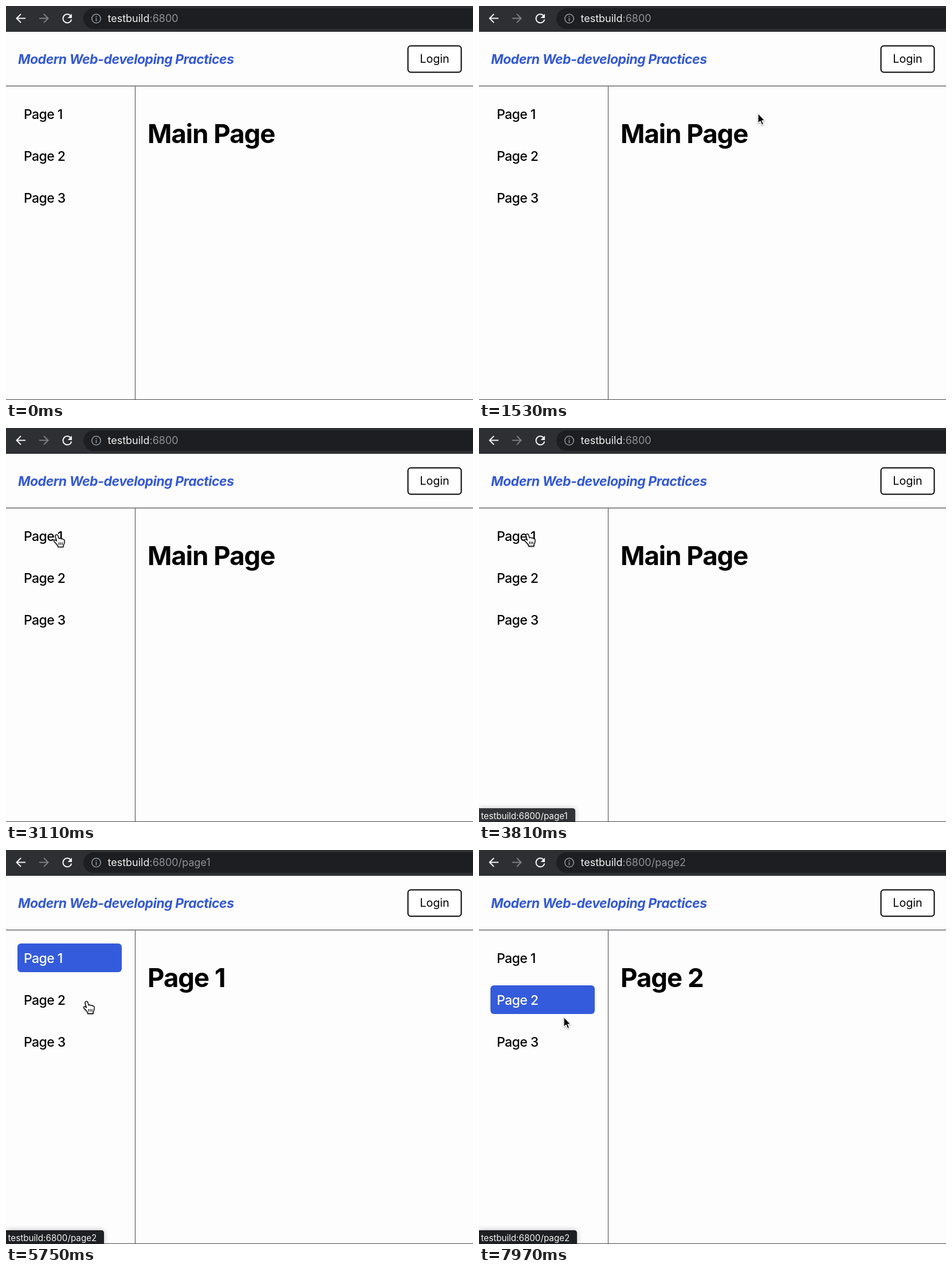
These frames come from a looping animation (815 by 687 pixels, 7990 ms). An HTML page:

```html
<!DOCTYPE html>
<html lang="en">
<head>
<meta charset="utf-8">
<style>
  html, body { margin: 0; width: 100%; height: 100%; overflow: hidden; background: #fdfdfd; }
  svg { display: block; width: 100%; height: 100%; font-family: Inter, "Open Sans", sans-serif; }
  .icon { fill: none; stroke: #f1f1f2; stroke-width: 2; }
  .dim { stroke: #7d7e82; }
  .rule { fill: none; stroke: #66666a; stroke-width: 1.3; }
  .brand { font: italic 700 23px Inter, sans-serif; letter-spacing: -.02em; fill: #3459d6; }
  .nav { font-size: 23px; font-weight: 500; letter-spacing: -.025em; }
  .heading { font-size: 45.5px; font-weight: 700; letter-spacing: -.022em; }
  #status { filter: drop-shadow(0 0 5px #0004); }
  #pointer { filter: drop-shadow(0 1.5px 1.2px #0006); stroke-linejoin: round; }
</style>
</head>
<body>
<svg viewBox="0 0 815 687">
  <rect width="815" height="687" fill="#fdfdfd"/>

  <rect width="815" height="45" fill="#2e2f33"/>
  <rect x="135" y="4" width="720" height="36" rx="18" fill="#1d1e21"/>
  <path class="icon" d="M34 21.5H18.5M26 14l-7.5 7.5L26 29"/>
  <path class="icon dim" d="M58 21.5h15.500M66 14l7.500 7.500L66 29"/>
  <path class="icon" d="M113 17.300A7.500 7.500 0 1 0 114.300 23.500"/>
  <path d="M115 13.500v7.500h-7.500z" fill="#f1f1f2"/>
  <circle class="icon" cx="157.500" cy="22" r="7.700" style="stroke:#8e969b;stroke-width:1.6"/>
  <path class="icon" d="M157.500 17.500v2M157.500 21v5.500" style="stroke:#8e969b;stroke-width:1.700"/>
  <text x="177.500" y="28" font-size="18" fill="#f1f1f2">testbuild<tspan id="path" fill="#8e9196"></tspan></text>

  <path class="rule" d="M0 139.500H815M225.500 139.500V687M0 686.300H815"/>
  <text class="brand" x="21" y="101">Modern Web-developing Practices</text>
  <rect x="701.500" y="69.500" width="93" height="46" rx="5" fill="#fff" stroke="#000" stroke-width="2"/>
  <text x="748" y="99" font-size="19.700" text-anchor="middle">Login</text>

  <rect id="highlight" x="20" width="182" height="50" rx="6" fill="#345bdb"/>
  <text class="nav" x="31" y="197">Page 1</text>
  <text class="nav" x="31" y="270">Page 2</text>
  <text class="nav" x="31" y="343">Page 3</text>
  <text class="heading" id="heading" x="247" y="239"></text>

  <g id="status">
    <path id="bubble" fill="#1e1f22"/>
    <text id="link" x="3.500" y="682" font-size="15.200" fill="#f4f4f5"></text>
  </g>

  <g id="pointer">
    <path id="arrow" d="M0 0V17.500L4 13.900 6.700 20.300 9.700 19 7 12.800H12Z" stroke="#fff" stroke-width="1.300"/>
    <g id="hand" stroke="#000" stroke-width="1.400" fill="#fff">
      <path d="M-3 3C-4-.3.500-1.400 1.500 1.500L3.300 6.800C4.400 5.400 6.600 5.700 7.200 7.300 8.500 6.200 10.100 6.700 10.500 8.200 12 7.600 13 8.700 12.900 10.200 13 13.500 12.500 15.700 10.900 18V21H1.500V19C-.600 16.500-2.200 14.300-4.500 12.200-7.200 9.400-4.300 7.900-2 9.700L-.700 10.700Z"/>
      <path d="M3.200 13v4.500M6 13v4.500M8.800 13v4.500" stroke-width="1.200"/>
    </g>
  </g>
</svg>
<script>
const LOOP = 7990, FIRST_CLICK = 3930, SECOND_CLICK = 5950, NEXT_LINK = 5300;
const get = id => document.getElementById(id);
const clamp = v => Math.max(0, Math.min(1, v));

// Pointer tip: time, x, y
const route = [
  [1190, 822, 160], [1530, 488, 187], [1570, 445, 190], [1670, 442, 190],
  [1900, 210, 192], [2100, 118, 190], [2410, 95, 188], [3250, 88, 186],
  [3810, 85, 185], [4190, 85, 185], [4930, 94, 195], [5030, 100, 213],
  [5400, 126, 249], [5770, 142, 265], [6610, 146, 267], [7550, 147, 270],
  [7970, 148, 291]
];

function pointerAt(t) {
  const next = route.findIndex(p => p[0] >= t);
  if (next < 0) return route.at(-1).slice(1);
  if (next === 0) return [900, 160];
  const a = route[next - 1], b = route[next], k = (t - a[0]) / (b[0] - a[0]);
  return [a[1] + (b[1] - a[1]) * k, a[2] + (b[2] - a[2]) * k];
}

function draw(time) {
  // Motion pauses for the last 100 ms of every 840 ms.
  const t = time - Math.max(0, (time + 10) % 840 - 740);
  const page = t < FIRST_CLICK ? 0 : t < SECOND_CLICK ? 1 : 2;
  get("path").textContent = ":6800" + (page ? "/page" + page : "");
  get("heading").textContent = page ? "Page " + page : "Main Page";
  get("highlight").setAttribute("y", 90 + 73 * page);
  get("highlight").style.display = page ? "" : "none";
  document.querySelectorAll(".nav").forEach((label, i) => {
    label.style.fill = i + 1 === page ? "#fff" : "#000";
  });

  const target = t < NEXT_LINK ? 1 : 2, right = target === 1 ? 168 : 171;
  get("link").textContent = "testbuild:6800/page" + target;
  get("bubble").setAttribute("d", `M0 663H${right - 5}q5 0 5 5V687H0Z`);
  get("status").style.opacity = clamp((t - 3650) / 178);

  const [x, y] = pointerAt(t);
  const overLink = x < 202 && (y >= 163 && y <= 213.5 || y >= 236 && y <= 286);
  get("pointer").setAttribute("transform", `translate(${x} ${y})`);
  get("hand").style.display = overLink ? "" : "none";
  get("arrow").style.display = overLink ? "none" : "";
}

const start = performance.now();
function tick() {
  draw((performance.now() - start) % LOOP);
  requestAnimationFrame(tick);
}
tick();
</script>
</body>
</html>
```
